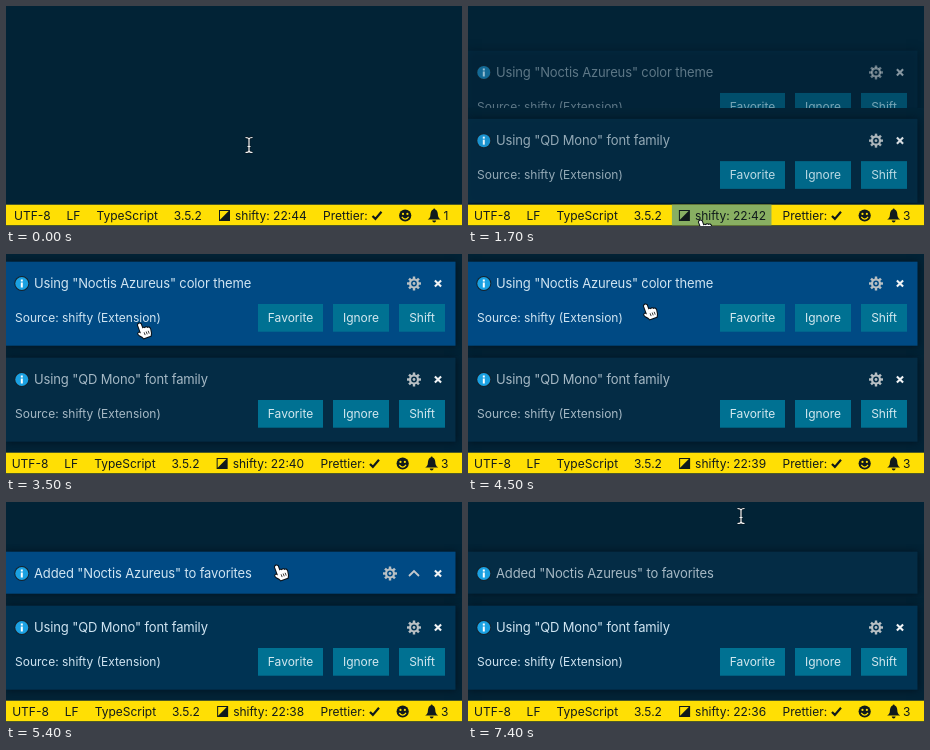
Recreate the animation shown at these times as an HTML page with a canvas. Size 456 px wide and 220 px high, loop 7.5 s.

```html
<!DOCTYPE html>
<html lang="en">
<head>
<meta charset="utf-8">
<title>Theme shift notifications</title>
<style>
  html, body { margin: 0; width: 100%; height: 100%; overflow: hidden; background: #022336; }
  canvas { display: block; width: 456px; height: 220px; }
</style>
</head>
<body>
<canvas></canvas>
<script>
const W = 456, H = 220, LOOP = 7500;
const canvas = document.querySelector('canvas');
const ctx = canvas.getContext('2d');
const dpr = window.devicePixelRatio || 1;
canvas.width = W * dpr;
canvas.height = H * dpr;

const INK = '#101a1c', YELLOW = '#ffdf04', GREY = '#b9c0c4';
const BAR_TOP = 198.7, BAR_HEIGHT = 20.6;
const BOTTOM_IN = 1500, TOP_IN = 1600, FAVORITED = 5150;

// Pointer keyframes: time, x, y
const POINTER = [
  [50, 243, 139], [1000, 234, 214], [2000, 234, 214], [2300, 149, 148],
  [3000, 140, 130], [3300, 140, 130], [3500, 135, 69], [4000, 142, 66],
  [4300, 142, 66], [4500, 179, 50], [5000, 276, 64], [5400, 272, 63],
  [6300, 272, 63], [7000, 273, 14]
];

const BUTTONS = [['Favorite', 252, 65], ['Ignore', 327, 56], ['Shift', 393, 46]];

const BELL = new Path2D('M0-7a1 1 0 0 1 1 1C4-5 3.5-1 4 1Q4.5 3 6.5 4H-6.5Q-4.5 3-4 1C-3.5-1-4-5-1-6A1 1 0 0 1 0-7ZM-2 5H2Q1.6 7 0 7T-2 5Z');
const HAND = new Path2D('M-1.5 1Q0-1 1.5 1V6Q3 4.8 4 6.4Q5.5 5.4 6.4 7Q8.6 6.4 8.6 9L8 13L6.8 15.5H-.5Q-1 14-3.6 11.2Q-5 9-3.4 8.6Q-2.4 8.6-1.5 10Z');
const KNUCKLES = new Path2D('M1.8 10V13M4 10V13M6.1 10V13');
const IBEAM = new Path2D('M-3.5-7.5Q0-7.5 0-5.5Q0-7.5 3.5-7.5M0-5.5V5.5M-3.5 7.5Q0 7.5 0 5.5Q0 7.5 3.5 7.5M-1.5 1.5H1.5');
const CROSS = new Path2D('M-3.1-3.1L3.1 3.1M3.1-3.1L-3.1 3.1');
const CHEVRON = new Path2D('M-5 2.5L0-2.5L5 2.5');
const CHECK = new Path2D('M-4.5 .5L-1.6 3.4L4.5-3.8');
const SMILE = new Path2D('M-3.4 1.4Q0 6 3.4 1.4');
const MODE = new Path2D('M-5.5-5.5H5.5V5.5H-5.5ZM-4.5 4.2V-4.5H4.2Z');

const clamp = v => Math.max(0, Math.min(1, v));
const easeOut = v => 1 - (1 - clamp(v)) ** 2;

function pointerAt(t) {
  const next = POINTER.findIndex(k => k[0] > t);
  if (next < 1) return POINTER.at(next).slice(1);
  const [t0, x0, y0] = POINTER[next - 1], [t1, x1, y1] = POINTER[next];
  const p = (t - t0) / (t1 - t0), e = p * p * (3 - 2 * p);
  return [x0 + (x1 - x0) * e, y0 + (y1 - y0) * e];
}

function setFont(size) {
  ctx.font = `${size}px Inter, sans-serif`;
  ctx.letterSpacing = size > 12 ? '-0.13px' : '0px';
}

function text(str, x, y, size, color, align = 'left') {
  setFont(size);
  ctx.textAlign = align;
  ctx.fillStyle = color;
  ctx.fillText(str, x, y);
}

function measure(str) {
  setFont(12);
  return ctx.measureText(str).width;
}

function rect(x, y, w, h, color) {
  ctx.fillStyle = color;
  ctx.fillRect(x, y, w, h);
}

function disc(x, y, r, color) {
  ctx.fillStyle = color;
  ctx.beginPath();
  ctx.arc(x, y, r, 0, 2 * Math.PI);
  ctx.fill();
}

function at(x, y, draw) {
  ctx.save();
  ctx.translate(x, y);
  draw();
  ctx.restore();
}

function stroke(path, color, width) {
  ctx.strokeStyle = color;
  ctx.lineWidth = width;
  ctx.stroke(path);
}

function gear(x, y) {
  at(x, y, () => {
    const ring = new Path2D();
    ring.arc(0, 0, 4, 0, 2 * Math.PI);
    stroke(ring, GREY, 2.2);
    disc(0, 0, 1.4, GREY);
    for (let i = 0; i < 8; i++) {
      ctx.rotate(Math.PI / 4);
      rect(-1.2, -7, 2.4, 3, GREY);
    }
  });
}

function info(x, y) {
  disc(x, y, 7.5, '#14232e');
  disc(x, y, 6.5, '#1ba1e2');
  rect(x - 1, y - 4, 2, 2, '#fff');
  rect(x - 1, y - 1, 2, 5, '#fff');
}

// A notification slides up inside its own clipped slot while fading in.
function toast({ title, y, h, start, hover, focus }, t) {
  const shown = easeOut((t - start) / 300);
  if (!shown) return;
  const expanded = h > 50;
  const color = hover || focus ? '#d0e5f2' : '#a6b9c5';
  ctx.save();
  ctx.beginPath();
  ctx.rect(0, y - 8, W, h + 18);
  ctx.clip();
  ctx.globalAlpha = shown;
  ctx.translate(0, y + (1 - shown) * h);
  ctx.shadowColor = '#00121f';
  ctx.shadowBlur = 8 * dpr;
  rect(0, -0.3, 449.5, h, hover ? '#004a84' : focus ? '#003353' : '#042c45');
  ctx.shadowColor = 'transparent';

  info(15.8, 21.5);
  text(title, 28, 26, 13, color);
  if (expanded || hover) {
    gear(expanded ? 408 : 384, 21.5);
    if (!expanded) at(408, 21.5, () => stroke(CHEVRON, '#c5c9cc', 1.8));
    at(432, 21.5, () => stroke(CROSS, '#f0f3f5', 2.1));
  }
  if (expanded) {
    text('Source: shifty (Extension)', 9, 60, 12, color);
    for (const [label, x, w] of BUTTONS) {
      rect(x, 42, w, 27.7, '#007192');
      text(label, x + w / 2, 60, 12, '#d3e8ef', 'center');
    }
  }
  ctx.restore();
}

function statusBar(t, hover) {
  const baseline = 214, mid = 209.5;
  const count = t < BOTTOM_IN ? '1' : t < TOP_IN ? '2' : '3';
  const timer = `shifty: 22:${44 - Math.floor((t + 700) / 1000)}`;
  // Items are anchored right, so wider labels push the rest to the left.
  const right = measure('1') - measure(count);
  const left = right + measure('shifty: 22:44') - measure(timer);

  rect(0, BAR_TOP, W, BAR_HEIGHT, YELLOW);
  if (hover) rect(206 + left, BAR_TOP, 100 + right - left, BAR_HEIGHT, '#88af62');
  const labels = [['UTF-8', 8], ['LF', 60.5], ['TypeScript', 90.5], ['3.5.2', 167.8], [timer, 229]];
  for (const [label, x] of labels) text(label, x + left, baseline, 12, INK);
  at(218.5 + left, mid, () => {
    ctx.fillStyle = INK;
    ctx.fill(MODE, 'evenodd');
  });

  text('Prettier:', 317 + right, baseline, 12, INK);
  at(371 + right, mid, () => stroke(CHECK, INK, 2.2));
  at(399.2 + right, mid, () => {
    disc(0, 0, 6.1, INK);
    disc(-2.2, -1.6, 1.1, YELLOW);
    disc(2.2, -1.6, 1.1, YELLOW);
    stroke(SMILE, YELLOW, 1.2);
  });
  at(428.2 + right, mid, () => {
    ctx.fillStyle = INK;
    ctx.fill(BELL);
  });
  text(count, 437.6 + right, baseline, 12, INK);
}

function pointer(x, y, hand) {
  at(x, y, () => {
    if (hand) {
      ctx.translate(-2, 0.5);
      ctx.rotate(-0.35);
      stroke(HAND, '#0a0f14', 2);
      ctx.fillStyle = '#fff';
      ctx.fill(HAND);
      stroke(KNUCKLES, '#222', 0.8);
    } else {
      stroke(IBEAM, '#0b1720', 2.4);
      stroke(IBEAM, '#f4f6f7', 1.2);
    }
  });
}

function draw(t) {
  const [x, y] = pointerAt(t);
  const favorited = t >= FAVORITED;
  const toasts = [
    favorited
      ? { title: 'Added "Noctis Azureus" to favorites', y: 50, h: 42, start: FAVORITED - 50 }
      : { title: 'Using "Noctis Azureus" color theme', y: 8, h: 84, start: TOP_IN },
    { title: 'Using "QD Mono" font family', y: 104, h: 84, start: BOTTOM_IN, focus: favorited }
  ];
  for (const item of toasts) {
    item.hover = t > item.start && x < 450 && y >= item.y && y < item.y + item.h;
  }
  const overBar = y >= BAR_TOP;

  ctx.setTransform(dpr, 0, 0, dpr, 0, 0);
  rect(0, 0, W, H, '#022336');
  toasts.forEach(item => toast(item, t));
  statusBar(t, overBar && x > 206 && x < 306);
  pointer(x, y, overBar || toasts.some(item => item.hover));
}

const begin = performance.now();
function frame() {
  draw((performance.now() - begin) % LOOP);
  requestAnimationFrame(frame);
}
frame();
</script>
</body>
</html>
```
